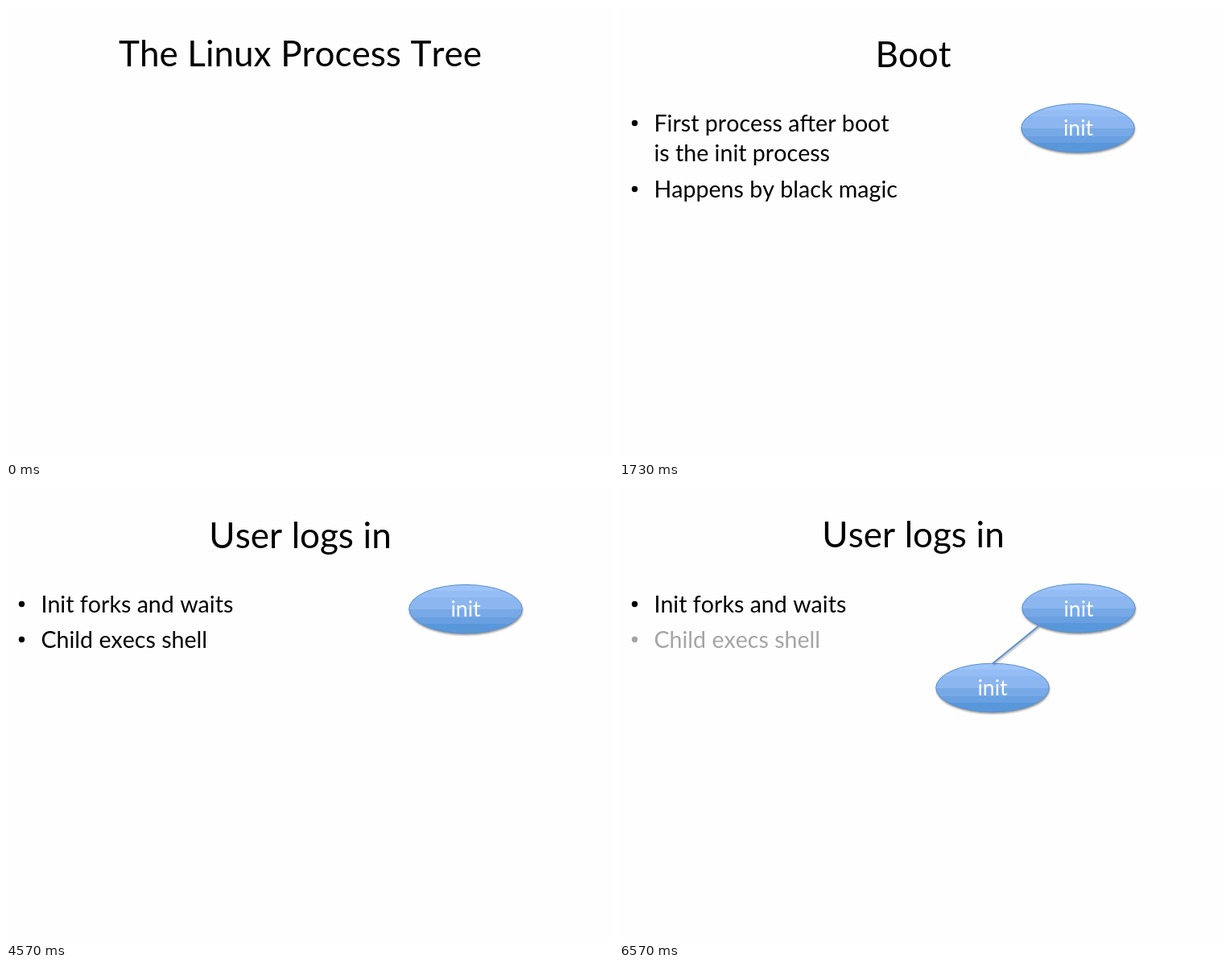
Animation, 754 px wide and 563 px high, one loop 8000 ms. Source, as an HTML page:

```html
<!DOCTYPE html>
<html lang="en">
<head>
<meta charset="utf-8">
<title>The Linux Process Tree</title>
<style>
html, body { margin: 0; width: 100%; height: 100%; overflow: hidden; background: #fefefe; }
svg { display: block; width: 754px; height: 563px; }
text { font-family: Lato, "Open Sans", sans-serif; font-kerning: none; }
.title { font-size: 44px; word-spacing: .4px; text-anchor: middle; }
.body { font-size: 28.6px; }
.label { font-size: 26.6px; text-anchor: middle; fill: #fff; }
</style>
</head>
<body>
<svg viewBox="0 0 754 563">
  <defs>
    <linearGradient id="blue" x2="0" y2="1"></linearGradient>
    <filter id="soft" x="-10%" y="-20%" width="120%" height="140%">
      <feGaussianBlur stdDeviation="0.8"/>
    </filter>
  </defs>
  <g id="stage"></g>
</svg>
<script>
const LOOP = 8000;
const stage = document.getElementById("stage");

// Stepped gradient: each colour is a flat band from one edge to the next
const edges = [0, 0.13, 0.26, 0.51, 0.67, 0.81, 1];
const shades = ["#9dc4fb", "#95bdf5", "#8cb6ef", "#77a9e7", "#69a0e1", "#5898da"];
document.getElementById("blue").innerHTML = shades.map((c, i) =>
  `<stop offset="${edges[i]}" stop-color="${c}"/><stop offset="${edges[i + 1]}" stop-color="${c}"/>`
).join("");

const title = (s, y = 76) => `<text class="title" x="365.5" y="${y}">${s}</text>`;

const line = (s, y, color = "#000") =>
  `<text class="body" x="43.4" y="${y}" fill="${color}">${s}</text>`;

const bullet = (s, y, color = "#000") =>
  `<circle cx="19.5" cy="${y - 10.5}" r="3.7" fill="${color}"/>` + line(s, y, color);

const node = (x, y, textX, textY) => `
  <ellipse cx="${x + 0.5}" cy="${y + 2}" rx="70.5" ry="30.5" fill="#000" opacity=".38" filter="url(#soft)"/>
  <ellipse cx="${x}" cy="${y}" rx="70.3" ry="30.3" fill="url(#blue)" stroke="#5a8fcb"/>
  <text class="label" x="${textX}" y="${textY}">init</text>`;

const edge = `
  <path d="M522 174.5L465 221" stroke="#000" stroke-width="2" opacity=".3" filter="url(#soft)"/>
  <path d="M521 173L464 219.5" stroke="#5a90d0" stroke-width="2"/>`;

const login = title("User logs in") + node(571, 151.7, 571, 161);

const scenes = [
  [0, title("The Linux Process Tree", 75)],
  [500, title("Boot") +
    bullet("First process after boot", 156) + line("is the init process", 193) +
    bullet("Happens by black magic", 238) + node(570, 151.7, 570.5, 161)],
  [2550, login],
  [4570, login + bullet("Init forks and waits", 156) + bullet("Child execs shell", 200)],
  [6570, title("User logs in", 75) +
    bullet("Init forks and waits", 156) + bullet("Child execs shell", 200, "#a5a5a5") +
    node(571, 150.7, 571, 161) + node(464, 249.5, 464, 259) + edge]
];

let shown, start;
function draw(now) {
  start ??= now;
  const t = (now - start) % LOOP;
  const scene = scenes.findLast(([from]) => from <= t);
  if (scene !== shown) {
    shown = scene;
    stage.innerHTML = scene[1];
  }
  requestAnimationFrame(draw);
}
requestAnimationFrame(draw);
</script>
</body>
</html>
```
